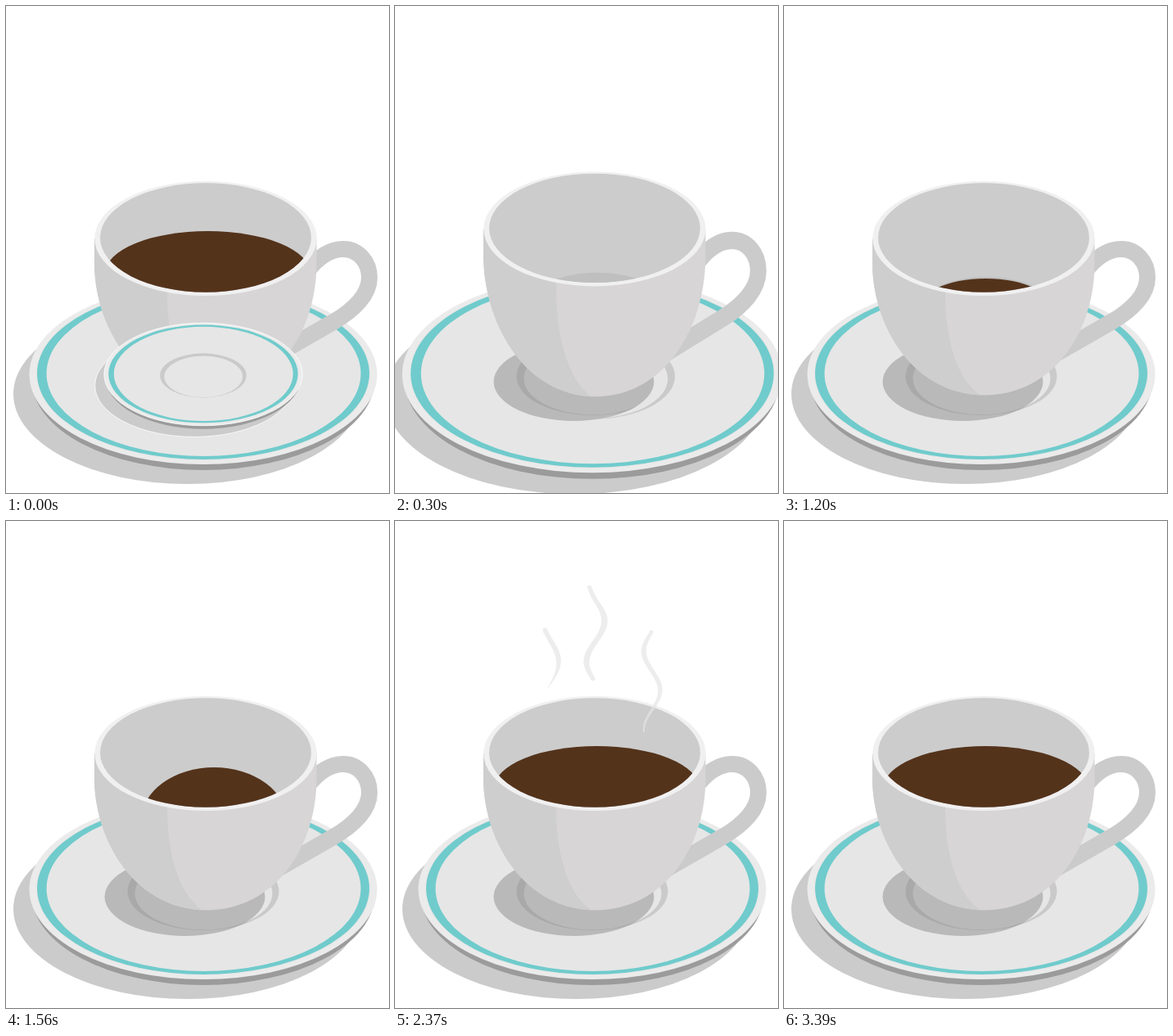
Animation of 468x595 px, one loop 3.92 s. Source, as an HTML page with a canvas:

```html
<!DOCTYPE html>
<html lang="en">
<head>
<meta charset="utf-8">
<title>Coffee cup</title>
<style>
  html, body { margin: 0; width: 100%; height: 100%; overflow: hidden; background: #fff; }
  canvas { display: block; width: 468px; height: 595px; }
</style>
</head>
<body>
<canvas id="stage" width="468" height="595"></canvas>
<script>
const ctx = document.getElementById('stage').getContext('2d');
const LOOP = 3920, STEP = 30, LAST = 3390, POUR = 960, STEAM_END = 3100;

const lerp = (a, b, u) => a + (b - a) * u;
const span = (t, from, to) => Math.max(0, Math.min(1, (t - from) / (to - from)));
const wave = u => Math.sin(Math.PI * u);
const easeOut = (u, power) => 1 - (1 - u) ** power;
const backOut = u => 1 + 2.70158 * (u - 1) ** 3 + 1.70158 * (u - 1) ** 2;

const plateSize = t => backOut(span(t, -90, 510));
const cupWidth = t => easeOut(span(t, 80, 320), 3);

// The cup shoots up, then bounces for one and a half periods.
function cupHeight(t) {
  const bounce = t > 255 && t < 705
    ? .1 * Math.exp((255 - t) / 310) * wave((t - 255) / 150) : 0;
  return easeOut(span(t, 120, 255), 2) + bounce;
}

// Each wisp slides up a wavy line; its tail sets off later than its head.
const STEAM = [
  { from: 249, to: 30, thick: 7, start: 1770, end: 2850, leave: 1920,
    x: y => 245 + 11 * wave(y < 97 ? (y - 97) / 68 : (y - 197) / 50) },
  { from: 268, to: 86, thick: 5.5, start: 1890, end: 2820, leave: 2260,
    x: y => 314 + 10 * wave((135 - y) / 48) },
  { from: 204, to: 96, thick: 6, start: 2100, end: 2700, leave: 2790,
    x: y => 190 + 10 * wave((y - 146) / 53) }
];

function disc(color, x, y, rx, ry) {
  ctx.beginPath();
  ctx.ellipse(x, y, rx, ry, 0, 0, 2 * Math.PI);
  ctx.fillStyle = color;
  ctx.fill();
}
function ring(color, outer, inner) {
  ctx.beginPath();
  for (const [x, y, rx, ry] of [outer, inner]) {
    ctx.moveTo(x + rx, y);
    ctx.ellipse(x, y, rx, ry, 0, 0, 2 * Math.PI);
  }
  ctx.fillStyle = color;
  ctx.fill('evenodd');
}
const wellRing = color => ring(color, [241, 452.5, 92.5, 47.5], [241.5, 455, 84, 44.3]);

// Scales what follows so that the point (x, y) lands on (x, toY).
function scaleAt(x, y, sx, sy, toY = y) {
  ctx.translate(x, toY);
  ctx.scale(sx, sy);
  ctx.translate(-x, -y);
}

function plate(size, edged) {
  ctx.save();
  scaleAt(241, 450, size, size);
  ctx.strokeStyle = '#fff';
  ctx.lineWidth = 1.4;
  disc('#cbcbcb', 221.5, 474, 212.5, 110);
  if (edged) ctx.stroke();
  disc('#9b9b9b', 241, 456.5, 209.5, 110.5);
  disc('#ebebeb', 241, 450, 212.5, 110);
  if (edged) ctx.stroke();
  disc('#e6e6e6', 241, 449, 204, 106);
  ring('#70cbcc', [241, 449, 203, 105], [241.5, 449, 192, 101]);
  wellRing('#cacaca');
  ctx.restore();
}

function cupShadow(r) {
  const u = span(r, .415, 1);
  disc('#b9b9b9', 218.5, lerp(452, 459, u), lerp(52, 98, u), lerp(32, 48, u));
  ctx.save();
  ctx.clip();
  ctx.globalAlpha = u;
  wellRing('#a9a9a9');
  ctx.restore();
}

function body() {
  ctx.beginPath();
  ctx.moveTo(108, 284);
  ctx.lineTo(108, 318);
  ctx.bezierCurveTo(110, 395, 160, 475, 245, 475.5);
  ctx.bezierCurveTo(328, 475, 378, 400, 379.5, 318);
  ctx.lineTo(379.5, 284);
  ctx.fillStyle = '#d7d5d6';
  ctx.fill();
  ctx.save();
  ctx.clip();
  ctx.beginPath();
  ctx.moveTo(197, 280);
  ctx.lineTo(197, 352);
  ctx.bezierCurveTo(197, 400, 208, 455, 242, 477);
  ctx.lineTo(100, 480);
  ctx.lineTo(100, 280);
  ctx.fillStyle = '#cecece';
  ctx.fill();
  ctx.restore();
}

function handle() {
  ctx.beginPath();
  ctx.moveTo(368, 324);
  ctx.bezierCurveTo(382, 306, 396, 297, 412, 297);
  ctx.bezierCurveTo(430, 297, 444, 312, 444, 332);
  ctx.bezierCurveTo(444, 352, 426, 371, 400, 386);
  ctx.lineTo(325, 429);
  ctx.strokeStyle = '#cbcbcb';
  ctx.lineWidth = 20;
  ctx.stroke();
}

// A puddle spreads on the floor, then rises and widens with a slight slosh.
function coffee(t) {
  const puddle = span(t, POUR - 120, POUR + 180);
  const u = span(t, 1200, 2070);
  const top = lerp(333, 275, easeOut(u, 1.5));
  const rx = lerp(86, 125, u ** 3);
  const ry = lerp(41, 51, u) + 20 * wave(u);
  disc('#54331b', 246.5 + 8 * wave(u), top + ry, rx * puddle, ry * puddle);
}

function cup(t) {
  const r = cupWidth(t), h = cupHeight(t);
  if (r === 0) return;
  const top = 449 - 165 * h;
  cupShadow(r);
  if (h > 0) {
    ctx.save();
    scaleAt(244, 284, r, h, top);
    handle();
    body();
    ctx.restore();
  }
  disc('#f1f0f1', 244, top, 135.7 * r, 70 * r);
  disc('#cccccc', 244, top - r, 129 * r, 66.7 * r);
  ctx.save();
  ctx.clip();
  ctx.globalAlpha = span(h, .4, .9);
  disc('#bfbfbf', 247, 449 - 76 * h, 85 * r, 42 * r);
  ctx.globalAlpha = 1;
  if (t >= POUR) coffee(t);
  ctx.restore();
}

function wisp({ from, to, thick, start, end, leave, x }, t) {
  const head = lerp(from, to, wave(span(t, start, end) / 2));
  const tail = lerp(from, to, span(t, leave, STEAM_END) ** 1.4);
  if (tail - head < 1) return;
  const half = y => .4 + thick / 2 * wave((from - y) / (from - to));
  ctx.beginPath();
  ctx.arc(x(head), head, half(head), Math.PI, 2 * Math.PI);
  for (let y = head; y < tail; y += 2) ctx.lineTo(x(y) + half(y), y);
  ctx.arc(x(tail), tail, half(tail), 0, Math.PI);
  for (let y = tail; y > head; y -= 2) ctx.lineTo(x(y) - half(y), y);
  ctx.fillStyle = 'rgba(229, 229, 229, .7)';
  ctx.fill();
}

function scene(t) {
  plate(plateSize(t));
  cup(t);
  STEAM.forEach(w => wisp(w, t));
}

function draw(time) {
  const t = Math.min(LAST, Math.floor(time / STEP) * STEP);
  ctx.fillStyle = '#fff';
  ctx.fillRect(0, 0, 468, 595);
  // At first the full cup lingers behind the next plate.
  scene(t || LAST);
  if (t === 0) plate(plateSize(0), true);
}

const begin = performance.now();
function tick() {
  draw((performance.now() - begin) % LOOP);
  requestAnimationFrame(tick);
}
tick();
</script>
</body>
</html>
```
